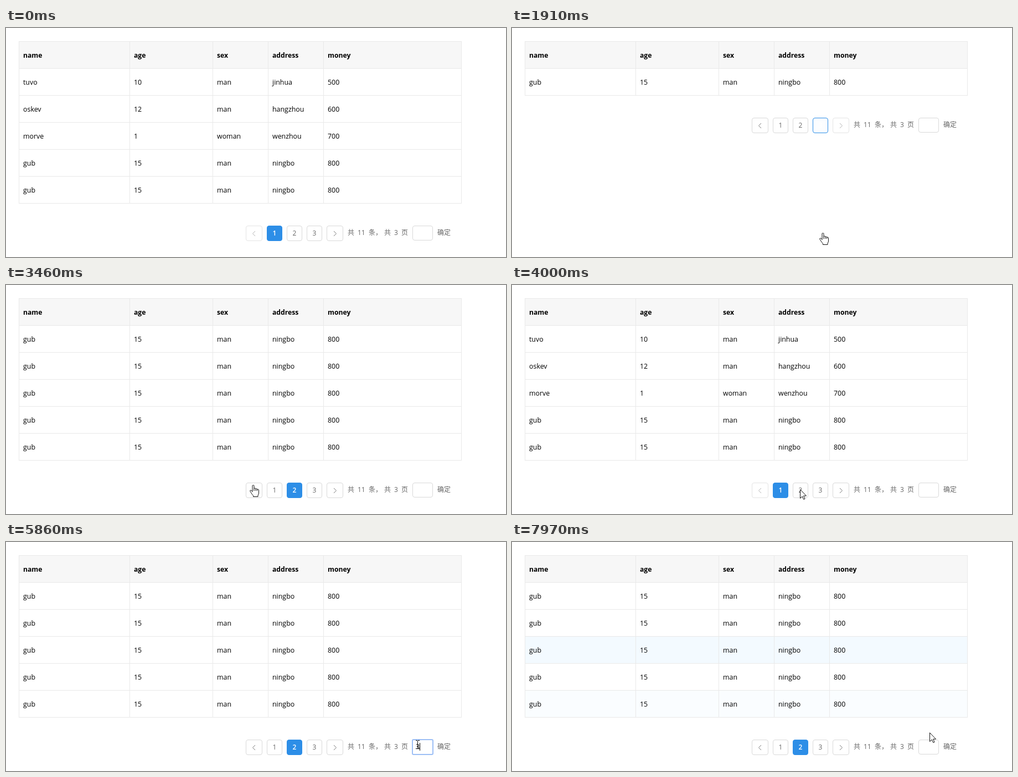
Animation, 903 px wide and 416 px high, one loop 8 s. Source, as an HTML page:

```html
<!DOCTYPE html>
<html lang="zh">
<head>
<meta charset="utf-8">
<title>Table pagination</title>
<style>
  html, body { margin: 0; width: 100%; height: 100%; overflow: hidden; background: #fff; }
  svg { display: block; }
  text { font-family: "Open Sans", "Noto Sans", "Noto Sans CJK SC", "Noto Sans CJK", sans-serif; white-space: pre; }
</style>
</head>
<body>
<svg id="stage" width="903" height="416" viewBox="0 0 903 416"></svg>
<script>
const LOOP = 8000, BLUE = '#2d8ee7', LINE = '#e9e9e9';
const ROW = 49, TOP = 24, LEFT = 23, RIGHT = 823;
const columns = [23, 223, 373, 473, 573];
const header = ['name', 'age', 'sex', 'address', 'money'];
const people = [
  ['tuvo', 10, 'man', 'jinhua', 500],
  ['oskev', 12, 'man', 'hangzhou', 600],
  ['morve', 1, 'woman', 'wenzhou', 700],
  ...Array.from({ length: 8 }, () => ['gub', 15, 'man', 'ningbo', 800])
];

// Timelines: [start, value]
const pages = [[0, 1], [820, 2], [1910, 3], [3000, 2], [3770, 1], [5250, 2], [6240, 3], [7580, 2]];
const typed = [[0, ''], [4870, '2'], [5250, ''], [5860, '3'], [6240, ''], [7180, '2'], [7580, '']];
const caret = [[0, 0], [4470, 1], [5710, 0], [5860, 1], [6740, 0], [7180, 1], [7330, 0]];
const focus = [[0, 0], [4470, 1], [7330, .5], [7430, 0]];
const fills = [[0, 1], [820, .1], [905, .6], [990, 1], [1910, .02], [1990, 1]];
const rowGlow = [
  { row: 2, from: 3000, to: 3300, alpha: 1 },
  { row: 2, from: 7580, to: LOOP, alpha: 1 },
  { row: 4, from: 7970, to: LOOP, alpha: .4 }
];
const hovers = [
  { item: '2', from: 540, full: 620, to: 820 },
  { item: '3', from: 1540, full: 1700, to: 1910 },
  { item: 'prev', from: 2700, full: 2850, to: 3000 },
  { item: 'prev', from: 3470, full: 3620, to: 3770 }
];

// Pointer moves: start, end, steps, destination, shape on the way, shape on arrival
const moves = [
  [200, 540, 5, 513, 373, 'arrow', 'hand'],
  [1240, 1540, 5, 555, 372, 'arrow', 'hand'],
  [2150, 2700, 8, 440, 179, 'arrow', 'hand'],
  [3230, 3460, 4, 440, 363, 'arrow', 'hand'],
  [3850, 4080, 4, 600, 379, 'arrow', 'arrow'],
  [4160, 4320, 3, 740, 360, 'arrow', 'beam'],
  [6540, 6790, 4, 806, 261, 'arrow', 'arrow'],
  [6870, 7100, 4, 792, 179, 'arrow', 'hand'],
  [7810, 7970, 3, 754, 346, 'arrow', 'arrow']
];

const shapes = {
  arrow: '<path d="M.5 .5V16.5L4.2 13L6.8 18.5L9 17.5L6.6 12H11.5Z" fill="#fff" stroke="#111"/>',
  hand: '<path d="M5 12.5V2Q5 .5 6.5 .5T8 2V7Q8 6 9.5 6T11 7.5V8Q11 7 12.3 7T13.7 8.5V9Q13.7 8 15.1 8T16.5 10V15Q16.5 17 15 19V21.5H6.5V19.5Q4 17 3 15T.7 11.5Q.5 9.5 2.5 10Q4 10.5 5 12.5" fill="#fff" stroke="#111"/>' +
        '<path d="M8 7V11M11 8V11M13.7 9V11" fill="none" stroke="#111"/>',
  beam: '<path d="M0 .5H3M4 .5H7M3.5 1V15M0 15.5H3M4 15.5H7" fill="none" stroke="#111"/>'
};

const clamp = v => Math.max(0, Math.min(1, v));
const ease = v => v * v * (3 - 2 * v);
const at = (line, t) => line.reduce((value, [start, next]) => t >= start ? next : value, line[0][1]);
const mix = (a, b, p) => 'rgb(' + a.map((v, i) => Math.round(v + (b[i] - v) * p)) + ')';
const accent = [45, 142, 231];

const rect = (x, y, w, h, fill) => `<rect x="${x}" y="${y}" width="${w}" height="${h}" fill="${fill}"/>`;
const box = (x, y, w, h, stroke, fill = '#fff') =>
  `<rect x="${x + .5}" y="${y + .5}" width="${w - 1}" height="${h - 1}" rx="3.5" fill="${fill}" stroke="${stroke}"/>`;
const text = (x, y, value, size = 12, color = '#666', extra = '') =>
  `<text x="${x}" y="${y}" font-size="${size}" fill="${color}" ${extra}>${value}</text>`;

function hoverOf(item, t) {
  const hover = hovers.find(h => h.item === item && t >= h.from && t < h.to);
  return hover ? clamp((t - hover.from) / (hover.full - hover.from)) : 0;
}

function table(rows, t) {
  const height = ROW * (rows.length + 1) + 1;
  let out = rect(LEFT, TOP, RIGHT - LEFT, ROW, '#f7f7f7');
  for (const glow of rowGlow)
    if (t >= glow.from && t < glow.to)
      out += rect(LEFT, TOP + ROW * (glow.row + 1), RIGHT - LEFT, ROW, mix([255, 255, 255], [243, 250, 255], glow.alpha));
  for (let i = 0; i <= rows.length + 1; i++) out += rect(LEFT, TOP + i * ROW, RIGHT - LEFT, 1, LINE);
  for (const x of [...columns, RIGHT - 1]) out += rect(x, TOP, 1, height, LINE);
  [header, ...rows].forEach((row, r) => row.forEach((cell, c) => {
    out += r ? text(columns[c] + 8, 54 + r * ROW, cell, 12.4, '#000')
             : text(columns[c] + 8, 54, cell, 12.2, '#000', 'font-weight="700"');
  }));
  return out;
}

function arrowButton(x, dir, disabled, hover) {
  const stroke = disabled ? '#e4e4e4' : mix([217, 217, 217], accent, hover);
  const color = disabled ? '#b5b5b5' : mix([125, 125, 125], accent, hover);
  const cx = x + 15;
  return box(x, 0, 30, 28, stroke) +
    `<path d="M${cx - 2 * dir} 10L${cx + 2.5 * dir} 14.5L${cx - 2 * dir} 19" fill="none" stroke="${color}"/>`;
}

function pageButton(n, page, t) {
  const x = 435 + 36 * n, active = n === page;
  const hover = active ? 1 : hoverOf(String(n), t);
  const fill = active ? mix([255, 255, 255], accent, at(fills, t)) : '#fff';
  const color = active ? '#fff' : mix([102, 102, 102], accent, hover);
  return box(x, 0, 28, 28, mix([217, 217, 217], accent, hover), fill) +
    text(x + 14, 18, n, 12, color, `text-anchor="middle" font-weight="${active ? 600 : 400}"`);
}

function input(t) {
  const ring = at(focus, t), value = at(typed, t);
  let out = box(734, 0, 37, 27, '#d9d9d9');
  if (ring) out += `<rect x="734" y="0" width="37" height="27" rx="2" fill="#fff" stroke="#9dbff5" stroke-width="2" opacity="${ring}"/>`;
  out += text(740, 17, value, 12, '#000');
  if (at(caret, t)) out += rect(value ? 747 : 740, 6, 1, 14, '#000');
  return out;
}

function pager(page, y, t) {
  let out = arrowButton(433, -1, page === 1, hoverOf('prev', t));
  for (let n = 1; n <= 3; n++) out += pageButton(n, page, t);
  out += arrowButton(579, 1, page === 3, 0);
  for (const [x, word] of [[617, '共'], [635, '11'], [655, '条，'], [683, '共'], [701, '3'], [714, '页'], [779, '确定']])
    out += text(x, 17, word);
  return `<g transform="translate(0 ${y})">${out}${input(t)}</g>`;
}

function pointer(t) {
  if (t < moves[0][0]) return '';
  let x = 580, y = 416, shape = 'arrow';
  for (const [start, end, steps, toX, toY, onWay, arrived] of moves) {
    if (t < start) break;
    const step = Math.min(steps, Math.floor((t - start) / (end - start) * (steps - 1) + 1e-6) + 1);
    const p = ease(step / steps);
    x += (toX - x) * p;
    y += (toY - y) * p;
    shape = step === steps ? arrived : onWay;
  }
  return `<g transform="translate(${Math.round(x)} ${Math.round(y)})">${shapes[shape]}</g>`;
}

const stage = document.getElementById('stage');
let shown = '';

function draw(t) {
  const page = at(pages, t);
  const rows = people.slice((page - 1) * 5, page * 5);
  const pagerY = TOP + ROW * (rows.length + 1) + 41;
  const markup = table(rows, t) + pager(page, pagerY, t) + pointer(t);
  if (markup !== shown) stage.innerHTML = shown = markup;
}

const begin = performance.now();
function tick() {
  draw((performance.now() - begin) % LOOP);
  requestAnimationFrame(tick);
}
tick();
</script>
</body>
</html>
```
